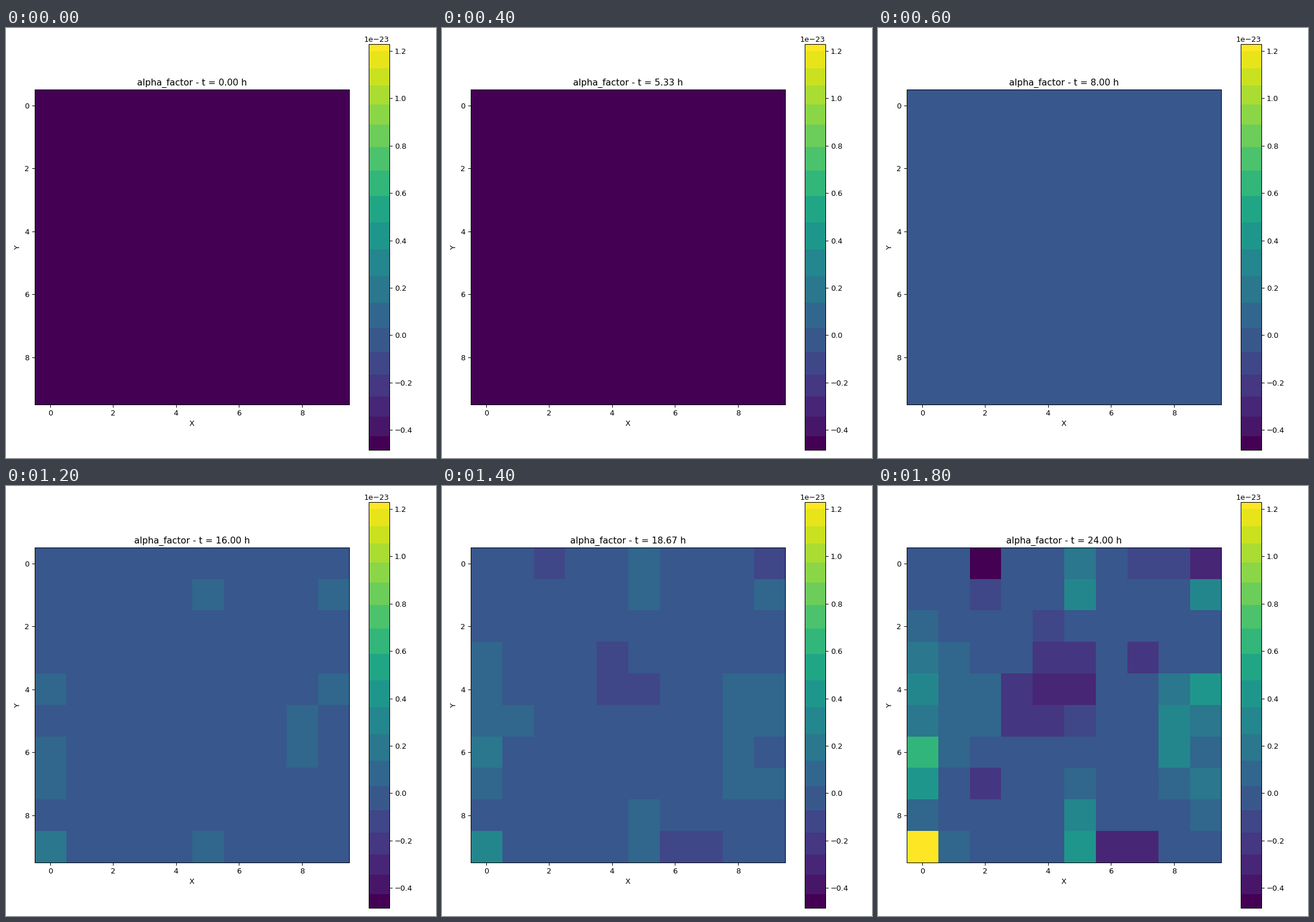
Write a matplotlib script that moves like this. It is 748 px wide and 748 px high and loops after 2 s.

```python
import matplotlib.pyplot as plt
import numpy as np
from matplotlib.animation import FuncAnimation
from matplotlib.cm import ScalarMappable
from matplotlib.colors import ListedColormap, Normalize

INCHES, DPI = 8, 93.5
STEPS, HOURS, GRID = 10, 24, 10
FILL_STEP, GROW_STEP, GROWTH = 3, 5, 1.58
UNIT = 1e-25
LOW, HIGH = -48.4, 122.9

# Sources and sinks: row, column, peak in UNIT, spread along the column
SPOTS = [
    (9, 0, 123, 0.35), (6.4, 0, 75, 0.55), (3.9, 0, 33, 1.1),
    (4.6, 1.5, 18, 0.9), (0, 2, -46, 0.55), (7, 2, -22, 0.4),
    (4.5, 3, -28, 0.6), (3.6, 4.5, -54, 1.3), (0.8, 5, 36, 0.65),
    (9, 5, 37, 1.15), (9, 6.45, -62, 0.35), (0, 7.5, -25, 0.4),
    (3, 7, -21, 0.5), (5.3, 8, 32, 1.1), (4.2, 9, 42, 0.5),
    (7.2, 9, 17, 0.7), (0, 9, -33, 0.4), (1, 9, 36, 0.4),
]
ROW_SPREAD = 0.44


def bell(distance, spread):
    return np.exp(-(distance / spread) ** 2 / 2)


rows, cols = np.indices((GRID, GRID))
final = sum(peak * bell(rows - r, spread) * bell(cols - c, ROW_SPREAD)
            for r, c, peak, spread in SPOTS)

# Colour bands, slightly wider in the middle of the scale
phase = np.linspace(0, np.pi, 18)
edges = (np.linspace(-42.8, 120, 18)
         + 3.3 * np.sin(phase) - 5 * np.sin(2 * phase))
bounds = np.concatenate([[LOW], edges, [HIGH]])
mids = (bounds[:-1] + bounds[1:]) / 2
mids[0], mids[-1] = LOW, HIGH
band_colors = plt.get_cmap("viridis")((mids - LOW) / (HIGH - LOW))


def colorize(values):
    return band_colors[np.digitize(values, edges)]


def field(step):
    if step < FILL_STEP:
        return np.full(final.shape, LOW)
    age = max(step - GROW_STEP, 0)
    full_age = STEPS - 1 - GROW_STEP
    return final * (GROWTH ** age - 1) / (GROWTH ** full_age - 1)


def caption(step):
    return f"alpha_factor - t = {step * HOURS / (STEPS - 1):.2f} h"


plt.rcParams["font.family"] = "DejaVu Sans"
fig, ax = plt.subplots(figsize=(INCHES, INCHES), dpi=DPI, facecolor="white")
image = ax.imshow(colorize(field(0)), interpolation="nearest")
ax.set_xticks(range(0, GRID, 2))
ax.set_yticks(range(0, GRID, 2))
ax.set_xlabel("X")
ax.set_ylabel("Y")
title = ax.set_title(caption(0))

bar_cmap = ListedColormap(colorize(np.linspace(LOW, HIGH, 706)))
bar_norm = Normalize(LOW * UNIT, HIGH * UNIT)
fig.colorbar(ScalarMappable(bar_norm, bar_cmap), ax=ax,
             ticks=np.arange(-40, 121, 20) * UNIT)
fig.tight_layout()


def update(step):
    image.set_data(colorize(field(step)))
    title.set_text(caption(step))
    return image, title


anim = FuncAnimation(fig, update, frames=STEPS, interval=200,
                     repeat=True, repeat_delay=0, blit=False)
plt.show()
```
